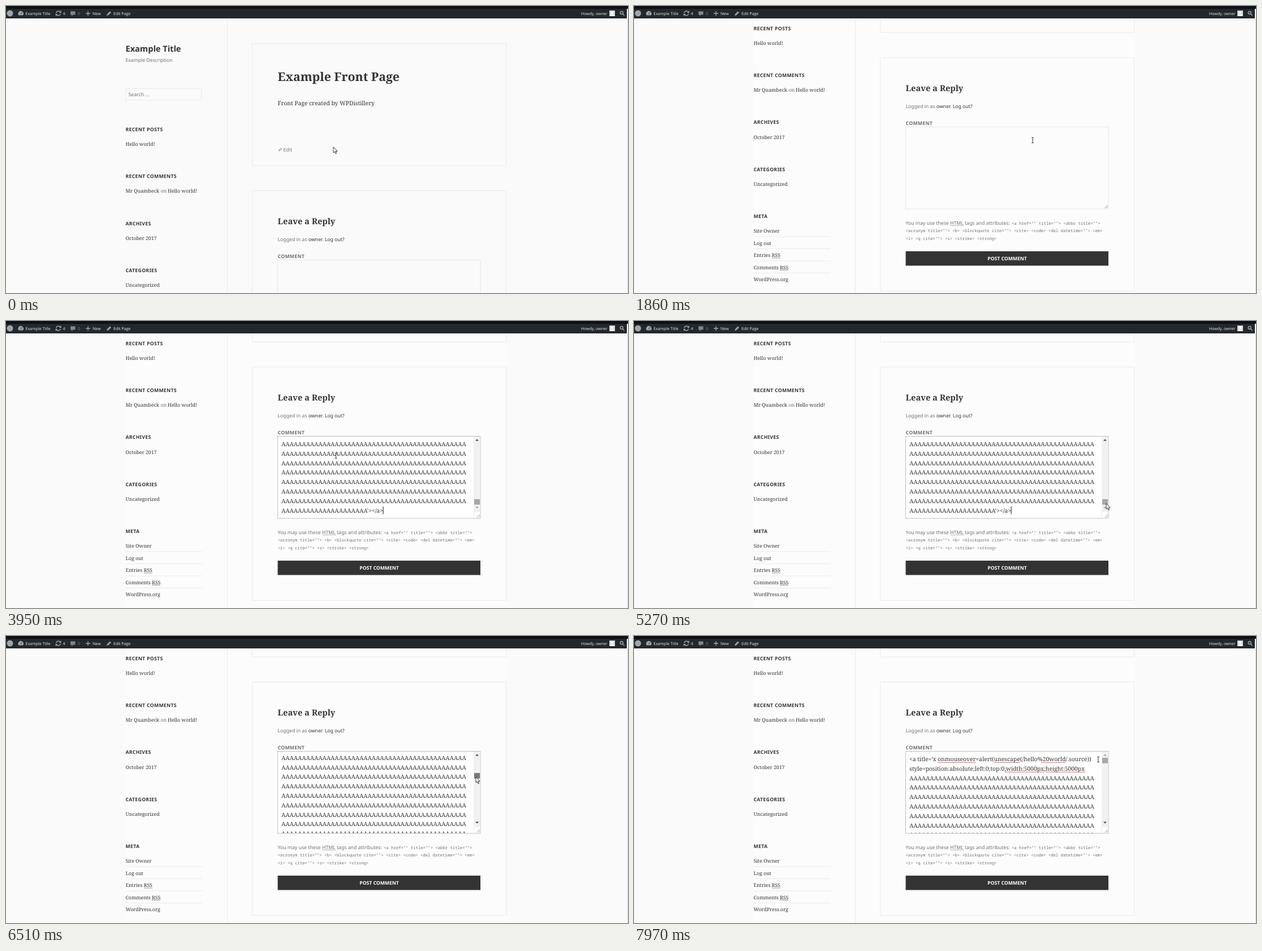
Recreate the animation shown at these times as an HTML page. Size 1100 by 509 pixels, loop 8000 ms.

```html
<!DOCTYPE html>
<html lang="en">
<head>
<meta charset="utf-8">
<title>Comment form</title>
<style>
  html, body { margin: 0; height: 100%; overflow: hidden; background: #fafafa; }
  #stage { display: block; width: 100vw; height: 100vh; }
  text { fill: #333; font: 8.7px "Noto Sans", sans-serif; white-space: pre; text-rendering: geometricPrecision; }
  .serif text { font: 8.75px "Noto Serif", serif; }
  .caps text, text.caps { font: bold 8.65px "Noto Sans", sans-serif; letter-spacing: .04em; }
  text.body, .body text { font: 10.3px "Noto Serif", serif; }
  text.title { font: bold 21.2px "Noto Serif", serif; }
  text.reply { font: bold 14.6px "Noto Serif", serif; }
  text.site { font: bold 14.57px "Noto Sans", sans-serif; }
  text.button { font: bold 8.65px "Noto Sans", sans-serif; fill: #fff; }
  text.code, .code text { font: 7.25px "Noto Sans Mono", monospace; }
  text.grey, .grey text, .grey { fill: #707070; }
  .bar text { font: 7.05px "Open Sans", sans-serif; fill: #eee; }
  .bar text.dim { fill: #82878c; }
  .line { fill: none; stroke: #eaeaea; }
  .icon { fill: none; stroke: #a0a5aa; stroke-width: 1.4; }
</style>
</head>
<body>
<svg id="stage" viewBox="0 0 1100 509" preserveAspectRatio="none">
  <rect width="1100" height="509" fill="#fafafa"/>
  <rect id="panel" x="211" y="22" width="674" height="487" fill="#fcfcfc"/>
  <path class="line" d="M391.5 22V509"/>

  <g id="sidebar">
    <text class="site" x="211.5" y="81">Example Title</text>
    <text class="grey" x="211.5" y="98.5" style="font-size:8.6px">Example Description</text>
    <rect class="line" x="212" y="146.5" width="134" height="20.5"/>
    <text class="grey" x="216.5" y="160">Search ...</text>
    <g class="caps">
      <text x="211.5" y="222">RECENT POSTS</text>
      <text x="211.5" y="305">RECENT COMMENTS</text>
      <text x="211.5" y="388.5">ARCHIVES</text>
      <text x="211.5" y="472">CATEGORIES</text>
      <text x="211.5" y="555">META</text>
    </g>
    <g class="serif">
      <text x="211.5" y="248">Hello world!</text>
      <text x="211.5" y="331">Mr Quambeck</text>
      <text class="grey" x="273.5" y="331">on</text>
      <text x="286" y="331">Hello world!</text>
      <text x="211.5" y="415">October 2017</text>
      <text x="211.5" y="498">Uncategorized</text>
      <text x="211.5" y="581.5">Site Owner</text>
      <text x="211.5" y="603">Log out</text>
      <text x="211.5" y="624.5">Entries RSS</text>
      <text x="211.5" y="646">Comments RSS</text>
      <text x="211.5" y="667.5">WordPress.org</text>
    </g>
    <path class="line" d="M212 588.5H347M212 610H347M212 631.5H347M212 653H347"/>
    <path d="M244 626.5h15M258 648h15" stroke="#333" stroke-width=".8" stroke-dasharray="1 .7"/>
  </g>

  <g id="main">
    <path class="line" d="M435.5 66.5H884.5V283H435.5ZM435.5 327.5H884.5V741.5H435.5Z"/>
    <text class="title" x="480.5" y="132.5">Example Front Page</text>
    <text class="body" x="480.5" y="176">Front Page created by WPDistillery</text>
    <path d="M482.5 257l.6-2 3-3 1.4 1.4-3 3z" fill="none" stroke="#707070" stroke-width=".9"/>
    <text class="grey" x="490.5" y="257.5">Edit</text>
    <text class="reply" x="480.5" y="387">Leave a Reply</text>
    <text class="grey" x="480.5" y="417">Logged in as <tspan fill="#333">owner</tspan>. <tspan fill="#333">Log out?</tspan></text>
    <text class="caps grey" x="480.5" y="447">COMMENT</text>

    <rect id="field" x="480.5" y="450.5" width="358.5" height="145.5"/>
    <svg x="481" y="451" width="346" height="144.5" viewBox="481 451 346 144.5">
      <g id="rows" class="body"></g>
      <path id="spelling" stroke="#e0454b" stroke-width="1" stroke-dasharray="1.6 .4"
        d="M537 470.5h67M637 470.5h46M720 470.5h43M656 487.3h69M728 487.3h70"/>
    </svg>
    <path id="caret" stroke="#111" d="M0 0v13.5"/>
    <g id="scrollbar">
      <rect x="827" y="451" width="11.5" height="133" fill="#f1f1f1"/>
      <rect x="827" y="584" width="11.5" height="11.5" fill="#fff" stroke="#e2e2e2" stroke-width=".7"/>
      <path id="up" d="M830 458.5l3-3 3 3z"/>
      <path id="down" d="M830 575.5l3 3 3-3z"/>
      <rect id="thumb" x="828" width="10" height="9.7"/>
    </g>
    <path d="M832.5 594.5l5.5-5.5M835.5 594.5l2.5-2.5" stroke="#888" stroke-width=".8"/>

    <text class="grey" x="480.5" y="623.5">You may use these HTML tags and attributes:</text>
    <path d="M560 625.5h23" stroke="#707070" stroke-width=".8" stroke-dasharray="1 .7"/>
    <g class="code grey">
      <text x="668" y="623.5">&lt;a href="" title=""&gt; &lt;abbr title=""&gt;</text>
      <text x="480.5" y="637">&lt;acronym title=""&gt; &lt;b&gt; &lt;blockquote cite=""&gt; &lt;cite&gt; &lt;code&gt; &lt;del datetime=""&gt; &lt;em&gt;</text>
      <text x="480.5" y="650.5">&lt;i&gt; &lt;q cite=""&gt; &lt;s&gt; &lt;strike&gt; &lt;strong&gt;</text>
    </g>
    <rect x="480.5" y="671" width="358.5" height="25.5" fill="#333"/>
    <text class="button" x="660" y="687" text-anchor="middle">POST COMMENT</text>
  </g>

  <g class="bar">
    <rect width="1100" height="22" fill="#23282d"/>
    <rect width="1100" height="5" fill="#0e1014"/>
    <circle cx="7" cy="13" r="5.5" fill="#a0a5aa"/>
    <path d="M22.5 16.5a4.7 4.7 0 1 1 7.4 0z" fill="#a0a5aa"/>
    <path d="M26 14.5l2-3.5" stroke="#23282d"/>
    <text x="34.5" y="15.6">Example Title</text>
    <path class="icon" d="M88.7 12.5a4 4 0 0 1 7-2M96.5 13.5a4 4 0 0 1-7 2"/>
    <path d="M94 12h4l-1-4zM91.2 14h-4l1 4z" fill="#a0a5aa"/>
    <text x="100.5" y="15.6">4</text>
    <path d="M114 9.5h8.5v6h-4l-2.5 2.5v-2.5h-2z" fill="#82878c"/>
    <text class="dim" x="127" y="15.6">0</text>
    <path class="icon" d="M141 13.2h8M145 9.2v8" stroke-width="1.8"/>
    <text x="153" y="15.6">New</text>
    <path d="M178 17.2l1-3 4.7-4.8 2.2 2.2-4.8 4.7z" fill="#a0a5aa"/>
    <text x="190" y="15.6">Edit Page</text>
    <text x="1017" y="15.6">Howdy, owner</text>
    <rect x="1067" y="8" width="10" height="10" fill="#d8d8d8"/>
    <path d="M1068 18c0-4 8-4 8 0z" fill="#fff"/>
    <circle cx="1072" cy="12" r="2.2" fill="#fff"/>
    <circle class="icon" cx="1088.7" cy="12" r="2.5"/>
    <path class="icon" d="M1090.5 14l3 3"/>
  </g>
  <path d="M1099 5V509" stroke="#fff" stroke-width="2"/>
  <path d="M1099.5 22V509" stroke="#d4d4d4"/>

  <path id="arrow" d="M0 0V10.2l2.3-2.1 1.6 3.7 1.7-.7-1.6-3.6h3.1z" fill="#fff" stroke="#222" stroke-width=".9"/>
  <path id="beam" d="M-2-4.7h1.5l.5.5.5-.5H2M0-4.5v9M-2 4.7h1.5l.5-.5.5.5H2" fill="none" stroke="#444" stroke-width="1.1"/>
</svg>

<script>
const LOOP = 8000, LINE = 16.8, LAST_ROW = 1447, LINES_PER_PX = 14.4;
const THUMB_TOP = 216, THUMB_END = 316, PAGE_END = 246, SIDEBAR_END = 179.5;

const ticks = [0, 150, 290, 420, 850, 1000, 1150, 1300, 1440, 1580, 1720, 1860, 1980, 2120, 2250,
  2570, 3120, 3950, 4510, 4660, 4810, 4960, 5120, 5270, 5420, 5540, 5700, 5830, 5960, 6090, 6240,
  6380, 6510, 6800, 6940, 7070, 7190, 7320, 7450, 7590, 7720, 7970];

// Keys are [time, ...values], joined by straight lines.
const pageKeys = [[800, 0], [1300, 136], [1860, 236], [2120, PAGE_END]];
const thumbKeys = [[5600, THUMB_END], [6090, 276.4104], [6510, 243.37], [6700, 243.37],
  [7070, 226.0331], [7650, THUMB_TOP]];
const pointerKeys = [[0, 579, 250], [290, 665, 236.5], [420, 705, 238], [1860, 705, 238],
  [2250, 583.5, 239], [4400, 583.5, 239], [5120, 834, 329], [5270, 835, 323.5], [5540, 833, 319],
  [6090, 832.5, 279], [6510, 831, 250], [6700, 831, 250], [7070, 830, 233], [7650, 829.5, 216],
  [7720, 829.5, 216], [7970, 821, 219]];

const headRows = ["<a title='x onmouseover=alert(unescape(/hello%20world/.source))",
  "style=position:absolute;left:0;top:0;width:5000px;height:5000px"];
const tailRow = "A".repeat(21) + "'></a>";
const fullRow = "A".repeat(45);

const el = id => document.getElementById(id);
const set = (id, name, value) => el(id).setAttribute(name, value);
const show = (id, on) => set(id, "visibility", on ? "visible" : "hidden");
const move = (id, x, y) => set(id, "transform", `translate(${x} ${y})`);

const rows = Array.from({ length: 11 }, () => {
  const row = document.createElementNS("http://www.w3.org/2000/svg", "text");
  row.setAttribute("x", 487);
  return el("rows").appendChild(row);
});

function valueAt(keys, t) {
  const next = keys.findIndex(key => key[0] > t);
  if (next < 0) return keys.at(-1).slice(1);
  if (next === 0) return keys[0].slice(1);
  const [a, b] = [keys[next - 1], keys[next]];
  const k = (t - a[0]) / (b[0] - a[0]);
  return a.slice(1).map((v, i) => v + (b[i + 1] - v) * k);
}

function rowText(n) {
  if (n < 0 || n > LAST_ROW) return "";
  return n === LAST_ROW ? tailRow : headRows[n] || fullRow;
}

function drawField(t) {
  const focused = t >= 2570, pasted = t >= 3950;
  set("field", "fill", focused ? "#fff" : "none");
  set("field", "stroke", focused ? "#bdbdbd" : "#e6e6e6");

  const [thumb] = valueAt(thumbKeys, t);
  const scroll = (thumb - THUMB_TOP) * LINES_PER_PX;
  const first = Math.floor(scroll) - 1;
  rows.forEach((row, i) => {
    row.textContent = pasted ? rowText(first + i) : "";
    row.setAttribute("y", 468 + LINE * (first + i - scroll));
  });
  show("spelling", pasted && scroll < 2);
  move("spelling", 0, -scroll * LINE);

  show("scrollbar", pasted);
  set("thumb", "y", Math.round(thumb) + PAGE_END);
  set("thumb", "fill", t >= 5700 && t < 7970 ? "#787878" : "#a8a8a8");
  set("up", "fill", thumb > THUMB_TOP ? "#444" : "#a3a3a3");
  set("down", "fill", thumb < THUMB_END ? "#444" : "#a3a3a3");

  const atEnd = pasted && thumb === THUMB_END;
  show("caret", atEnd ? (t - 3950) % 1000 < 500 : focused && t < 3120);
  if (atEnd) move("caret", 667, 575);
  else move("caret", 487.5, 457);
}

function draw(now) {
  const time = now % LOOP;
  const t = ticks.findLast(tick => tick <= time);
  const [page] = valueAt(pageKeys, t);
  show("panel", t >= 850);
  move("sidebar", 0, -Math.min(page, SIDEBAR_END));
  move("main", 0, -page);
  drawField(t);

  const [x, y] = valueAt(pointerKeys, t);
  const typing = t >= 1860 && x < 827;
  show("beam", typing);
  show("arrow", !typing);
  move(typing ? "beam" : "arrow", x, y);
}

const start = performance.now();
(function loop() {
  draw(performance.now() - start);
  requestAnimationFrame(loop);
})();
</script>
</body>
</html>
```
